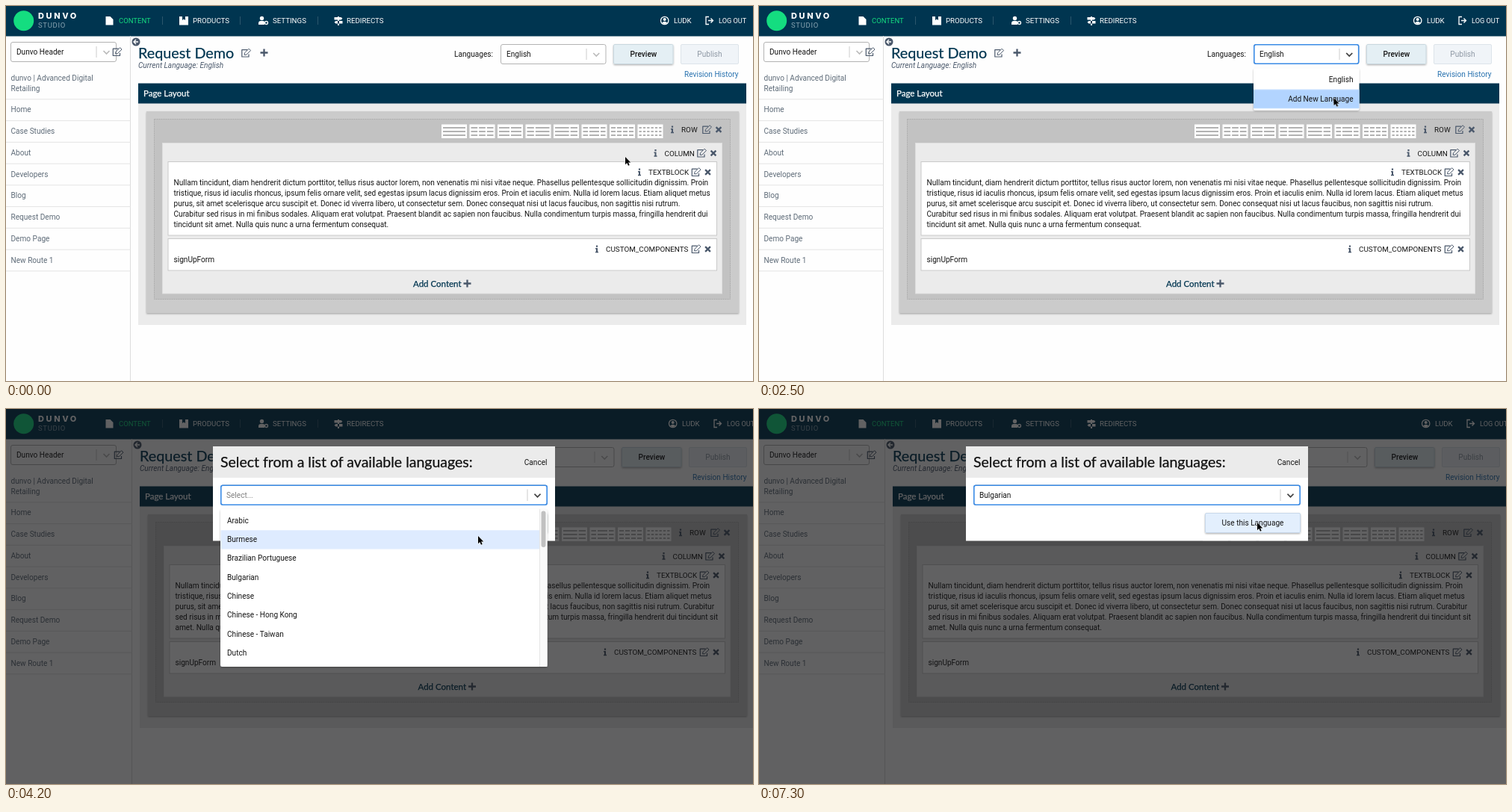
Recreate the animation shown at these times as an HTML page. Size 1000x502 px, loop 7400 ms.

```html
<!DOCTYPE html>
<html lang="en">
<head>
<meta charset="utf-8">
<title>Adding a language</title>
<style>
html, body { margin: 0; width: 100%; height: 100%; overflow: hidden; background: #fff; }
svg { display: block; width: 100vw; height: 100vh; }
text { font: 10.1px Roboto, sans-serif; fill: #161616; white-space: pre; }
.lato { font-family: Lato, sans-serif; fill: currentColor; stroke: currentColor; stroke-width: .25px; }
.title { font-size: 19.8px; color: #003550; }
.dialog { font-size: 19.5px; color: #111; }
.sub { font-size: 11.5px; color: #003550; }
.nav { font-size: 9.7px; fill: #fff; }
.side { fill: #5f6c79; }
.mid { text-anchor: middle; }
.end { text-anchor: end; }

.step { animation: 7.4s step-end infinite; }
.pageA { animation-name: leaveA; }
.pageB { animation-name: enterB; }
.menu { animation-name: openMenu; }
.menuRow { animation-name: menuRow; }
.blur { animation-name: blur; }
.focus { animation-name: focus; }
.picking { animation-name: picking; }
.picked { animation-name: picked; }
.row { animation-name: row; }
.caret { animation-name: caret; }
.hover { animation-name: hover; }
.cursor { animation: move 7.4s ease-in-out infinite; }

@keyframes leaveA { 35.135%, 100% { opacity: 0 } }
@keyframes enterB { 0% { opacity: 0 } 35.135% { opacity: 1 } }
@keyframes openMenu { 0% { opacity: 0 } 18.919% { opacity: 1 } }
@keyframes menuRow {
  0% { transform: translateY(0); fill: #deebff }
  26.5% { transform: translateY(25.3px); fill: #deebff }
  32.432%, 100% { transform: translateY(25.3px); fill: #b2d4ff }
}
@keyframes blur { 50%, 100% { opacity: 0 } }
@keyframes focus { 0% { opacity: 0 } 50% { opacity: 1 } }
@keyframes picking { 71.622%, 100% { opacity: 0 } }
@keyframes picked { 0% { opacity: 0 } 71.622% { opacity: 1 } }
@keyframes row {
  0% { transform: translateY(0); fill: #deebff }
  55.4% { transform: translateY(25.3px); fill: #deebff }
  60.5% { transform: translateY(50.6px); fill: #deebff }
  64.8% { transform: translateY(75.9px); fill: #deebff }
  68.919%, 100% { transform: translateY(75.9px); fill: #b2d4ff }
}
@keyframes caret { 0% { opacity: 1 } 56.49% { opacity: 0 } 63.65% { opacity: 1 } 70.81%, 100% { opacity: 0 } }
@keyframes hover { 0% { opacity: 0 } 82% { opacity: 1 } }
@keyframes move {
  0%, 1.35% { transform: translate(829px, 202px) }
  14.86%, 20.27% { transform: translate(790.5px, 66px) }
  31.08%, 36.49% { transform: translate(769.5px, 123px) }
  47.3%, 51.35% { transform: translate(689px, 106px) }
  56.76% { transform: translate(632px, 170px) }
  66.2%, 75.68% { transform: translate(614px, 217px) }
  85.14%, 94.6% { transform: translate(664px, 151px) }
  98.65%, 100% { transform: translate(667px, 152px) }
}
</style>
</head>
<body>
<svg viewBox="0 0 1000 502" preserveAspectRatio="none">
  <defs>
    <filter id="shadow" x="-10%" y="-10%" width="120%" height="130%">
      <feDropShadow dx="0" dy="1.2" stdDeviation="1.2" flood-opacity=".3"/>
    </filter>
    <g id="edit" fill="none" stroke="#4a586b" stroke-linejoin="round">
      <path d="M1.5-4.3H-5.7V5H3.5V1.5" stroke-width="1.2"/>
      <path d="M-2.4 2.4-2-.2 3.6-5.8 6-3.4.4 2.2z"/>
    </g>
    <path id="close" d="M-3.4-3.4 3.4 3.4M3.4-3.4-3.4 3.4" stroke="#4a586b" stroke-width="2.3"/>
    <path id="info" d="M-1.1-5h2.2v2.2h-2.2zM-2-1.6h3v4.9h1v1.5h-4v-1.5h1v-3.4h-1z" fill="#4a586b"/>
    <path id="plus" d="M-5 0H5M0-5V5" stroke="#4a586b" stroke-width="2.3"/>
    <path id="chevron" d="M-4-2 0 2 4-2" fill="none" stroke-width="1.7"/>
  </defs>
</svg>
<script>
const NAVY = '#003550', BLUE = '#3a8be6', GREEN = '#14dd80';

// Line breaks: | always, < narrow layout only, > wide layout only
const LOREM = 'Nullam tincidunt, diam hendrerit dictum porttitor, tellus risus auctor lorem, non venenatis mi nisi vitae neque. Phasellus pellentesque sollicitudin dignissim. Proin|tristique, risus id iaculis rhoncus, ipsum felis ornare velit, sed egestas ipsum lacus dignissim eros. Proin et iaculis enim. Nulla id lorem lacus. Etiam aliquet metus|purus, sit amet scelerisque arcu suscipit et. Donec id viverra libero, ut consectetur sem. Donec consequat nisi ut lacus faucibus, non sagittis nisi rutrum.<Curabitur>sed risus in mi finibus sodales. Aliquam erat volutpat. Praesent blandit ac sapien non faucibus. Nulla condimentum turpis massa, fringilla hendrerit dui<tincidunt sit>amet. Nulla quis nunc a urna fermentum consequat.';
const LANGUAGES = ['Arabic', 'Burmese', 'Brazilian Portuguese', 'Bulgarian', 'Chinese', 'Chinese - Hong Kong', 'Chinese - Taiwan', 'Dutch'];
const ROUTES = ['Home', 'Case Studies', 'About', 'Developers', 'Blog', 'Request Demo', 'Demo Page', 'New Route 1'];
const GRIDS = [[12], [4, 4, 4], [6, 6], [4, 8], [8, 4], [3, 6, 3], [3, 3, 3, 3], [2, 2, 2, 2, 2, 2]];

const text = (x, y, s, cls = '', attrs = '') => `<text x="${x}" y="${y}" class="${cls}" ${attrs}>${s}</text>`;
const rect = (x, y, r, b, fill, attrs = '') =>
  `<rect x="${x}" y="${y}" width="${r - x}" height="${b - y}" fill="${fill}" ${attrs}/>`;
const circle = (x, y, r, attrs) => `<circle cx="${x}" cy="${y}" r="${r}" ${attrs}/>`;
const path = (d, attrs) => `<path d="${d}" ${attrs}/>`;
const use = (id, x, y, attrs = '') => `<use href="#${id}" x="${x}" y="${y}" ${attrs}/>`;
const group = (cls, s) => `<g class="step ${cls}">${s}</g>`;
const shadow = 'filter="url(#shadow)"';

const select = (x, y, r, b, gap) =>
  rect(x + .5, y + .5, r - .5, b - .5, '#fff', 'stroke="#b3b3b3" rx="2.5"') +
  path(`M${r - gap} ${y + 6}V${b - 6}`, 'stroke="#ccc"') +
  use('chevron', r - gap / 2, (y + b) / 2 + .5, 'stroke="#bbb"');
const focusRing = (x, y, r, b, gap) =>
  rect(x + .8, y + .8, r - .8, b - .8, 'none', `stroke="${BLUE}" stroke-width="1.6" rx="2.5"`) +
  use('chevron', r - gap / 2, (y + b) / 2 + .5, 'stroke="#444"');
const button = (x, y, r, b, fill, stroke, attrs = '') =>
  rect(x + .5, y + .5, r - .5, b - .5, fill, `stroke="${stroke}" rx="1.5" ${attrs}`);
const tools = (x, editX, cy, label) =>
  use('info', x - 12, cy) + text(x, cy + 3.7, label, '', 'style="font-size:9.9px"') +
  use('edit', editX, cy) + use('close', editX + 15.5, cy);

function gridIcon(cols, i) {
  const x = 583 + i * 37.5, unit = (30 - 2 * (cols.length - 1)) / 12;
  let pos = x + 2, d = '';
  for (const c of cols) {
    for (const y of [163, 168, 173]) d += `M${pos} ${y}h${c * unit}`;
    pos += c * unit + 2;
  }
  return rect(x, 158.5, x + 34, 177, '#fff') + path(d, 'stroke="#999" stroke-width="1.3"');
}

function header(dr) {
  const white = 'fill="#fff"', line = 'fill="none" stroke="#fff" stroke-width="1.3"';
  return rect(0, 0, 1000, 40.5, NAVY) +
    circle(23.7, 19.8, 13.5, `fill="${GREEN}"`) +
    text(43, 17, 'DUNVO', '', 'style="font:800 11px Inter,sans-serif;letter-spacing:2.6px;fill:#fff"') +
    text(43, 29, 'STUDIO', '', 'style="font-size:9.5px;letter-spacing:.7px;fill:#8ba5b2"') +
    path('M133.5 14h6l4 4v7.5h-10z', white) +
    text(151, 23, 'CONTENT', 'nav', `style="fill:${GREEN};font-size:9.5px"`) +
    path('M232 14h4v5l2-1.5 2 1.5v-5h4v11.5h-12z', white) + text(250, 23, 'PRODUCTS', 'nav') +
    circle(342.5, 16.5, 2.7, white) + path('M338 25v-2q0-3 3-3h3q1.5 0 2 1v4z', white) +
    circle(348.5, 22.5, 2, line) + text(357, 23, 'SETTINGS', 'nav') +
    path('M439.5 15h9l2 1.7-2 1.7h-9zM450.5 20h-9l-2 1.7 2 1.7h9zM444 14h2v12h-2z', white) +
    text(456, 23, 'REDIRECTS', 'nav') +
    path('M209.5 14V25M313.5 14V25M417.5 14V25', 'stroke="#2c566c"') +
    `<g transform="translate(${dr})">` +
    circle(881.7, 19.5, 5.2, line) + circle(881.7, 18, 2, white) +
    path('M878 22.5q3.7-3.5 7.4 0l-3.7 2z', white) +
    text(894, 23, 'LUDK', 'nav') +
    path('M941 14.5h-4v10h4M940 19.5h6M943.5 16.5l3 3-3 3', line) +
    text(954, 23, 'LOG OUT', 'nav', 'style="font-size:9.2px"') + '</g>';
}

function sidebar(dx) {
  const edge = 166.5 + dx;
  let s = path(`M${edge} 40V502`, 'stroke="#ddd"') +
    select(6, 48, 148, 75, 27) + text(14, 64.5, 'Dunvo Header') + use('edit', 149 + dx, 61.5) +
    text(6.5, 99.5, 'dunvo | Advanced Digital', 'side') + text(6.5, 113.5, 'Retailing', 'side') +
    path(`M0 124.9H${edge}`, 'stroke="#e4e4e4"');
  ROUTES.forEach((name, i) => {
    s += text(6.5, 142.3 + i * 28.75, name, 'side') + path(`M0 ${153.6 + i * 28.75}H${edge}`, 'stroke="#e4e4e4"');
  });
  return s;
}

function page(dx, dr, lines, extra) {
  const shift = (by, s) => `<g transform="translate(${by})">${s}</g>`;
  const box = (x, y, r, b, fill, attrs) => rect(x + dx, y, r + dr, b, fill, attrs);
  const mid = (dx + dr) / 2;
  return rect(0, 0, 1000, 502, '#fefefe') + header(dr) + sidebar(dx) +
    shift(dx, circle(174, 48, 5.5, 'fill="#4a586b"') +
      path('M177 48H171.5M174 45l-3 3 3 3', 'fill="none" stroke="#fff" stroke-width="1.4"') +
      text(177, 69.5, 'Request Demo', 'lato title') +
      use('edit', 321.5, 63) + use('plus', 345.5, 62.5) +
      text(177, 82.5, 'Current Language: English', '', 'style="font-style:italic;fill:#4a586b"')) +
    box(177, 130, 991, 427, '#ebebeb') + box(177, 103.5, 991, 130.5, NAVY) +
    text(184 + dx, 121, 'Page Layout', 'lato sub', 'style="color:#fff"') +
    box(188, 141, 981, 411, '#cbcbcb', shadow) +
    box(198.5, 151.5, 969.5, 392.5, '#c2c2c2', 'stroke="#acacac" stroke-dasharray="2 1"') +
    box(209.5, 183.5, 958.5, 385, '#ebebeb', 'stroke="#dedede"') +
    box(217, 208.5, 951.5, 307, '#fff', 'stroke="#cacaca"') +
    box(217, 311.5, 951.5, 354, '#fff', 'stroke="#cacaca"') +
    lines.map((s, i) => text(224.5 + dx, 240 + i * 14, s)).join('') +
    text(224.5 + dx, 343, 'signUpForm') +
    text(545 + mid, 375.5, 'Add Content', 'lato sub') + use('plus', 617.5 + mid, 371.5) +
    shift(dr, text(600, 68, 'Languages:') + select(662, 51, 803.5, 78, 26.5) + text(670, 68, 'English') +
      button(813, 51, 893.5, 78, '#e4eff4', '#c8d7df', shadow) +
      text(853.5, 68, 'Preview', 'mid', 'style="font-weight:500"') +
      button(903, 51, 981, 78, '#f0f4f8', '#dde4ea') + text(942, 68, 'Publish', 'mid', 'style="fill:#8f99a5"') +
      text(980.5, 95, 'Revision History', 'end', 'style="fill:#2a73b0"') +
      GRIDS.map(gridIcon).join('') +
      tools(904, 938.5, 165.5, 'ROW') + tools(881.5, 931.5, 197, 'COLUMN') +
      tools(860, 924, 222.5, 'TEXTBLOCK') + tools(803, 924, 325.5, 'CUSTOM_COMPONENTS') + extra);
}

const ring = focusRing(662, 51, 803.5, 78, 26.5);

const menu = group('menu', ring +
  rect(662, 83.5, 803.5, 139.5, '#fff', `rx="2" ${shadow}`) +
  rect(662, 86.5, 803.5, 111.8, '#deebff', 'class="step menuRow"') +
  text(795.5, 102.3, 'English', 'end') + text(795.5, 127.5, 'Add New Language', 'end'));

const list = group('picking', group('focus',
  rect(287, 134, 724.5, 345, '#fff', `rx="2.5" ${shadow}`) +
  rect(714, 134, 724.5, 345, '#fafafa') + path('M714.5 134V345', 'stroke="#e6e6e6"') +
  rect(716.5, 136.5, 722.5, 185, '#c1c1c1', 'rx="3"') +
  rect(287.5, 137, 714, 162.3, '#deebff', 'class="step row"') +
  LANGUAGES.map((s, i) => text(296, 152.8 + i * 25.3, s)).join('') +
  rect(294.8, 109, 295.8, 121, '#222', 'class="step caret"')));

const modal = rect(0, 0, 1000, 502, '#101012', 'opacity=".66"') +
  rect(277, 50, 735, 176.5, '#fff') + rect(277, 50, 735, 92, '#ebebeb') +
  text(287, 78, 'Select from a list of available languages:', 'lato dialog') +
  text(724.5, 74.7, 'Cancel', 'end') +
  select(287, 101.5, 725, 129, 27) + group('focus', focusRing(287, 101.5, 725, 129, 27)) +
  group('picking', text(295, 118.5, 'Select...', '', 'style="fill:#808080"')) +
  group('picked', text(295, 118.5, 'Bulgarian')) +
  button(597, 139, 725, 166, '#e6f0f5', '#cedbe2', shadow) +
  group('hover', button(597, 139, 725, 166, '#e3effd', '#c8d8ea')) +
  text(661, 155.7, 'Use this Language', 'mid') + list;

const narrow = LOREM.replace(/>/g, ' ').split(/[|<]/);
const wide = LOREM.replace(/</g, ' ').split(/[|>]/);

document.querySelector('svg').insertAdjacentHTML('beforeend',
  group('pageA', page(0, 0, narrow, menu)) +
  group('pageB', page(2, 11, wide, group('blur', ring)) + modal) +
  path('M0 0V10.2L2.3 8.1 4 11.8 5.7 11 4.1 7.5H7.3Z',
    'class="cursor" stroke="#fff" stroke-width=".8" paint-order="stroke"'));
</script>
</body>
</html>
```
